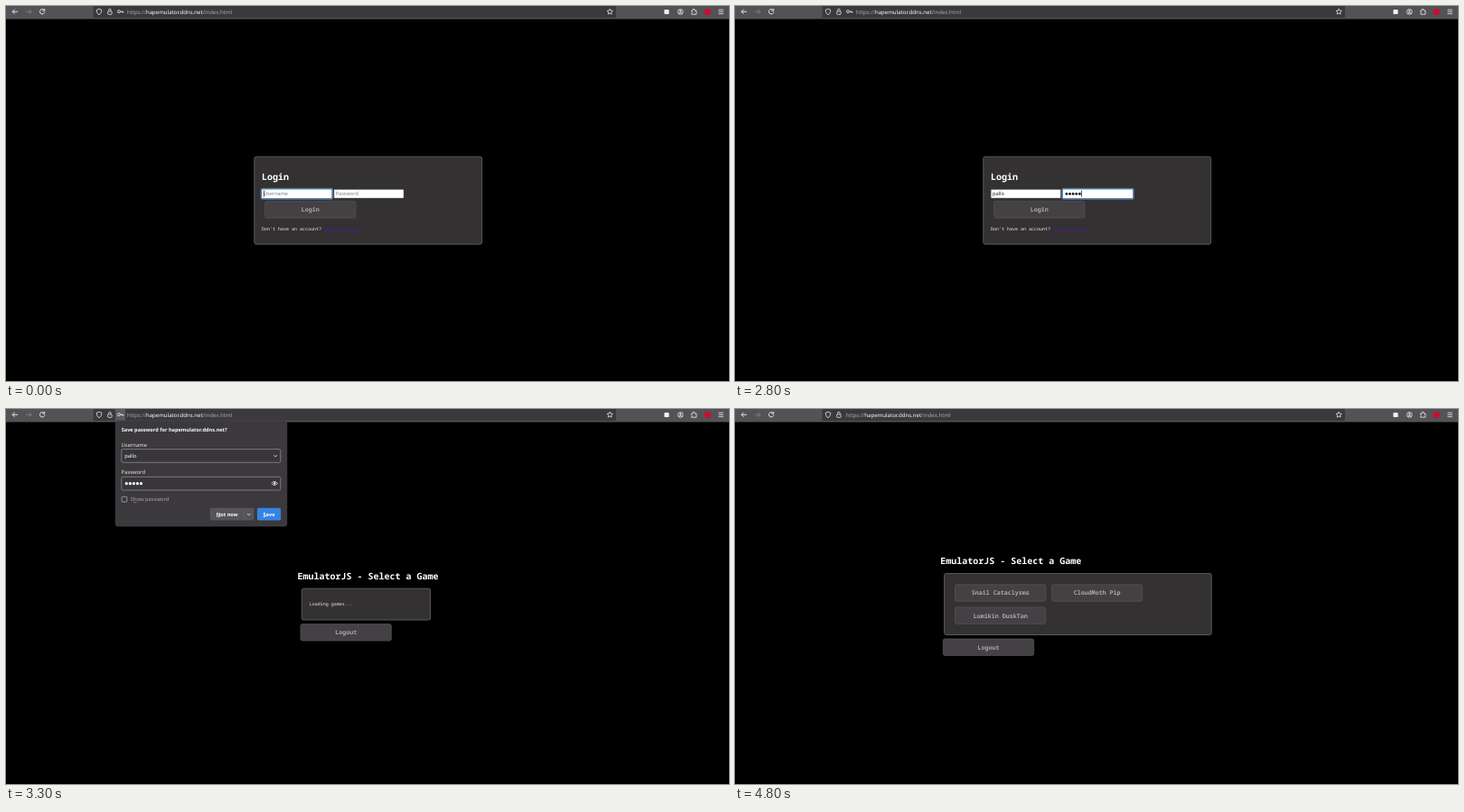
An HTML page with a canvas for the animation above (5400 ms loop, 800 px wide and 416 px high).

```html
<!DOCTYPE html>
<html lang="en">
<head>
<meta charset="utf-8">
<title>Login and game list</title>
<style>
html, body { margin: 0; width: 100%; height: 100%; overflow: hidden; background: #000; }
canvas { display: block; width: 800px; height: 416px; }
</style>
</head>
<body>
<canvas id="stage" width="800" height="416"></canvas>
<script>
const ctx = document.getElementById('stage').getContext('2d');
const LOOP = 5400;
const USER = 'pallo';
const OLD_USER = 'hap';
const HOST = 'hapemulator.ddns.net';
const USER_KEYS = [500, 700, 900, 1000, 1200];
const PASS_KEYS = [1900, 2100, 2300, 2500, 2700];

const sans = (size, weight = 400) => `${weight} ${size}px "Noto Sans", sans-serif`;
const mono = (size, weight = 400) => `${weight} ${size}px "Noto Sans Mono", monospace`;
const UI = sans(5.83), UI_BOLD = sans(5.6, 700), FIELD = sans(5.55), URL_FONT = sans(6.07);
const BODY = mono(5), HEADING = mono(10, 700), BUTTON = mono(6.67, 700);

const countKeys = (keys, t) => keys.filter(k => t >= k).length;

// Draws text and returns its width.
function text(str, x, y, font, color, align = 'left') {
  ctx.font = font;
  ctx.fillStyle = color;
  ctx.textAlign = align;
  ctx.fillText(str, x, y);
  return ctx.measureText(str).width;
}

function rect(x, y, w, h, color) {
  ctx.fillStyle = color;
  ctx.fillRect(x, y, w, h);
}

function box(x, y, w, h, r, fill, stroke, line = 0.8) {
  ctx.beginPath();
  ctx.roundRect(x, y, w, h, r);
  if (fill) {
    ctx.fillStyle = fill;
    ctx.fill();
  }
  if (stroke) {
    ctx.strokeStyle = stroke;
    ctx.lineWidth = line;
    ctx.stroke();
  }
}

function disc(x, y, r, color) {
  ctx.beginPath();
  ctx.arc(x, y, r, 0, Math.PI * 2);
  ctx.fillStyle = color;
  ctx.fill();
}

function ring(x, y, r, color, width = 0.75) {
  ctx.beginPath();
  ctx.arc(x, y, r, 0, Math.PI * 2);
  ctx.strokeStyle = color;
  ctx.lineWidth = width;
  ctx.stroke();
}

function line(d, color, width = 0.8) {
  ctx.strokeStyle = color;
  ctx.lineWidth = width;
  ctx.stroke(new Path2D(d));
}

function dots(n, x, y, pitch, r, color) {
  for (let i = 0; i < n; i++) disc(x + i * pitch, y, r, color);
}

// Label with one underlined access key.
function keyLabel(str, key, x, y, font, color) {
  text(str, x, y, font, color);
  const start = ctx.measureText(str.slice(0, key)).width;
  rect(x + start, y + 0.8, ctx.measureText(str[key]).width, 0.5, color);
}

function star(cx, cy, r, color) {
  ctx.beginPath();
  for (let i = 0; i < 10; i++) {
    const a = i * Math.PI / 5 - Math.PI / 2;
    const d = i % 2 ? r * 0.48 : r;
    ctx.lineTo(cx + d * Math.cos(a), cy + d * Math.sin(a));
  }
  ctx.closePath();
  ctx.strokeStyle = color;
  ctx.lineWidth = 0.75;
  ctx.stroke();
}

function toolbar(t) {
  const saving = t >= 3100 && t < 4800;
  const hasKey = t < 4800;
  const ink = '#f2f1f3';
  rect(0, 0, 800, 14.5, '#545256');
  box(96.5, -2, 578.5, 15, 1.5, '#3b393c');
  if (saving) rect(121, 0, 11, 13, '#5d5b60');

  line('M13 6.3H7.2M9.7 3.7L7.1 6.3L9.7 8.9', ink, 0.9);
  line('M22.2 6.3H28M25.5 3.7L28.1 6.3L25.5 8.9', '#858388', 0.9);
  line('M42.3 4.6A2.7 2.7 0 1 0 42.8 6.7M42.7 3V5.2H40.4', ink, 0.9);

  line('M103 3.2L105.7 4.2C105.7 7 104.8 8.7 103 9.7C101.2 8.7 100.3 7 100.3 4.2Z', ink, 0.75);
  box(112.7, 5.9, 4.4, 3.4, 0.6, null, ink, 0.75);
  line('M113.6 5.9V4.6A1.3 1.3 0 0 1 116.2 4.6V5.9', ink, 0.75);
  if (hasKey) {
    ring(125, 6.2, 1.5, ink, 0.8);
    line('M126.5 6.2H129.9V7.7M128.3 6.2V7.4', ink);
  }

  let x = hasKey ? 134 : 122.4;
  x += text('https://', x, 8.7, URL_FONT, '#aaa8ac');
  x += text(HOST, x, 8.7, URL_FONT, '#fbfbfe');
  text('/index.html', x, 8.7, URL_FONT, '#aaa8ac');

  star(668.2, 6.4, 3.3, ink);
  box(728.4, 3.9, 5.2, 5.2, 0.8, ink);
  ring(746.3, 6.4, 2.9, ink);
  disc(746.3, 5.5, 1.1, ink);
  line('M744.4 8.2Q746.3 6.5 748.2 8.2', ink, 1);
  line('M758.7 5H760V4.2A1 1 0 0 1 762 4.2V5H763.9V9.2H758.7V8A1 1 0 0 0 758.7 6.2Z', ink, 0.8);
  disc(776.2, 6.4, 3.6, '#c8102e');
  line('M788.4 4.2H793.8M788.4 6.4H793.8M788.4 8.6H793.8', ink, 0.8);
}

const panel = (x, y, w, h) => box(x, y, w, h, 2, '#333132', '#636163', 0.9);

function button(label, x, y) {
  box(x, y, 100.3, 18.4, 2, '#444145', '#545256', 0.8);
  text(label, x + 50.2, y + 11.6, BUTTON, '#aaa8aa', 'center');
}

function field(x, focused) {
  if (focused) {
    box(x - 1.3, 202.4, 79.4, 11.9, 1.4, null, 'rgba(255, 255, 255, 0.6)', 0.5);
    box(x - 0.6, 203.1, 78, 10.5, 0.8, '#fff', '#4a8fd0', 1);
  } else {
    box(x, 203.7, 76.8, 9.3, 0.4, '#fff', '#a3a2a8', 0.4);
  }
}

const caret = x => rect(x, 204.7, 0.7, 7, '#111');

function loginPage(t) {
  const typed = USER.slice(0, countKeys(USER_KEYS, t));
  const secret = countKeys(PASS_KEYS, t);
  const onPass = t >= 1500;

  panel(274.8, 167.2, 251.8, 97);
  text('Login', 283, 193.1, HEADING, '#fff');

  field(283.4, !onPass);
  field(363.1, onPass);
  if (!typed) text('Username', 285, 210.3, FIELD, '#7d7b80');
  const typedWidth = text(typed, 285, 210.3, FIELD, '#222');
  if (!onPass) caret(285 + typedWidth);

  if (!secret) text('Password', 364.7, 210.3, FIELD, '#7d7b80');
  dots(secret, 366.9, 208.4, 3.62, 1.4, '#111');
  if (onPass) caret(364.9 + secret * 3.65);

  button('Login', 286.6, 216.7);
  text("Don't have an account?", 283, 248.8, BODY, '#f4f4f4');
  text('Register here', 352, 248.8, BODY, '#551a8b');
  rect(352, 249.4, 39, 0.5, '#551a8b');
}

function loadingPage() {
  text('EmulatorJS - Select a Game', 322.5, 188.6, HEADING, '#fff');
  panel(327.3, 199.2, 142.3, 34.8);
  text('Loading games...', 335.8, 218.4, BODY, '#eee');
  button('Logout', 326, 238.6);
}

function gamesPage() {
  text('EmulatorJS - Select a Game', 227.2, 172, HEADING, '#fff');
  panel(231.6, 182.5, 295.6, 68);
  button('Snail Cataclysms', 243.5, 194.8);
  button('CloudMoth Pip', 350.4, 194.8);
  button('Lumikin DuskTan', 243.5, 220);
  button('Logout', 230.3, 255);
}

function savePopup(t) {
  const opening = t < 3200;
  const closing = t >= 4700;
  ctx.save();
  ctx.globalAlpha = opening || closing ? 0.5 : 1;
  if (opening) ctx.translate(0, -0.4);

  const ink = '#fbfbfe', rim = '#8d8b8f';
  box(121.2, 12.8, 189.6, 117.2, 2.5, '#3b393b', '#4c4a4d', 0.6);
  text(`Save password for ${HOST}?`, 127.7, 25.1, UI_BOLD, ink);

  text('Username', 127.6, 41.7, UI, '#e8e7ea');
  box(127.8, 44.6, 176, 14.7, 1.5, '#383638', rim, 0.8);
  text(opening ? OLD_USER : USER, 131.2, 54.1, UI, ink);
  line('M296.4 51.2L298.2 53L300 51.2', ink);

  text('Password', 127.6, 72.3, UI, '#e8e7ea');
  box(127.8, 75.3, 176, 14.7, 1.5, '#383638', rim, 0.8);
  dots(opening ? 3 : 5, 133.3, 82.7, 4.05, 1.6, ink);
  line('M293.9 82.5Q297.2 78.3 300.5 82.5Q297.2 86.7 293.9 82.5Z', ink, 0.7);
  disc(297.2, 82.5, 1.2, ink);

  box(128.1, 97.3, 5.8, 5.8, 0.7, null, '#aaa8ac', 0.8);
  keyLabel('Show password', 1, 137.7, 102.4, UI, '#aaa8ac');

  box(225.8, 109.8, 48.6, 13.7, 1.6, '#575558');
  rect(263, 111, 0.5, 11.3, '#69676a');
  keyLabel('Not now', 0, 232.8, 118.7, UI_BOLD, ink);
  line('M267 116.1L268.7 117.8L270.4 116.1', ink);
  box(277.9, 109.8, 26.2, 13.7, 1.6, '#3584e4');
  keyLabel('Save', 0, 284.5, 118.7, UI_BOLD, '#fff');
  ctx.restore();
}

function draw(t) {
  ctx.textRendering = 'geometricPrecision';
  rect(0, 0, 800, 416, '#000');
  if (t < 3300) loginPage(t);
  else if (t < 3600) loadingPage();
  else gamesPage();
  toolbar(t);
  if (t >= 3100 && t < 4800) savePopup(t);
}

const start = performance.now();
function tick() {
  draw((performance.now() - start) % LOOP);
  requestAnimationFrame(tick);
}
tick();
</script>
</body>
</html>
```
